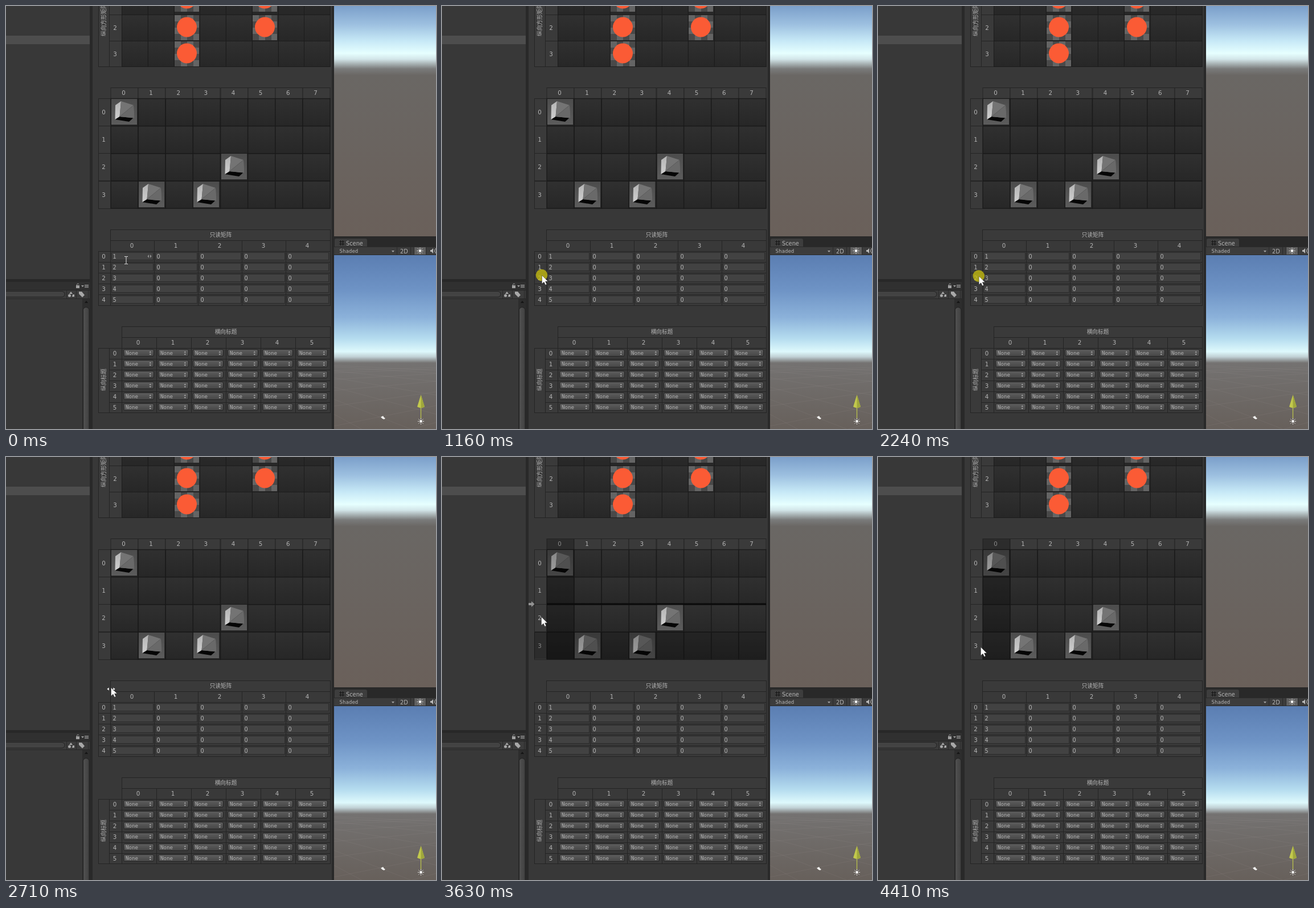
Animation of 755 by 742 pixels, one loop 5100 ms. Source, as an HTML page:

```html
<!DOCTYPE html>
<html lang="zh">
<head>
<meta charset="utf-8">
<title>Matrix editor</title>
<style>
html, body { margin: 0; width: 100%; height: 100%; overflow: hidden; background: #383838; }
svg { display: block; width: 755px; height: 742px; }
text { font: 10.3px "DejaVu Sans", sans-serif; fill: #b4b4b4; }
.mid { text-anchor: middle; }
.cjk { font: 9.7px "Noto Sans CJK SC", "Noto Sans CJK", sans-serif; }
.small { font: 9.1px "DejaVu Sans Mono", monospace; }
.value { font-size: 9.8px; }
.tab { font-size: 9.8px; }
</style>
</head>
<body>
<svg id="stage" viewBox="0 0 755 742" xmlns="http://www.w3.org/2000/svg">
<defs>
  <linearGradient id="cell" x2="0" y2="1"><stop stop-color="#303030"/><stop offset="1" stop-color="#272727"/></linearGradient>
  <linearGradient id="tile" x2="0" y2="1"><stop stop-color="#4c4c4c"/><stop offset="1" stop-color="#5c5c5c"/></linearGradient>
  <linearGradient id="face" x2="0" y2="1"><stop stop-color="#b4b4b4"/><stop offset="1" stop-color="#cfcfcf"/></linearGradient>
  <linearGradient id="popup" x2="0" y2="1"><stop stop-color="#5e5e5e"/><stop offset="1" stop-color="#464646"/></linearGradient>
  <linearGradient id="thumb"><stop stop-color="#525252"/><stop offset="1" stop-color="#404040"/></linearGradient>
  <linearGradient id="gameSky" x2="0" y2="1">
    <stop stop-color="#7b9fca"/><stop offset=".08" stop-color="#9dc0e0"/><stop offset=".15" stop-color="#c6e8f6"/>
    <stop offset=".205" stop-color="#e6ffff"/><stop offset=".23" stop-color="#d3e6e9"/><stop offset=".272" stop-color="#7a7b7b"/>
    <stop offset=".3" stop-color="#6a6764"/><stop offset="1" stop-color="#6a605a"/>
  </linearGradient>
  <linearGradient id="sceneSky" x2="0" y2="1">
    <stop stop-color="#5b7eb2"/><stop offset=".2" stop-color="#6e93c5"/><stop offset=".36" stop-color="#8cb2da"/>
    <stop offset=".48" stop-color="#b5dcef"/><stop offset=".555" stop-color="#def9fc"/><stop offset=".585" stop-color="#c0d0d4"/>
    <stop offset=".62" stop-color="#747271"/><stop offset="1" stop-color="#67605b"/>
  </linearGradient>
  <clipPath id="sceneClip"><path d="M576 627H755V742H576z"/></clipPath>
  <g id="cube">
    <path fill="url(#tile)" d="M1 1h45v45H1z"/>
    <path fill="#060606" d="M7.500 37 16 31 41 33 32 41z"/>
    <path fill="url(#face)" d="M8 12 18 5 15.500 32 7.500 37z"/>
    <path fill="#747474" d="M18 5 40 12 41 34.500 15.500 32z"/>
    <path fill="#696969" d="M40 12 41 34.500 15.500 32z"/>
    <path fill="none" stroke="#555" stroke-width=".7" d="M15.500 32 40 12"/>
  </g>
  <g id="badge">
    <path fill="#494949" d="M0 0h43v44H0z"/>
    <path fill="#646464" d="M0 0h11v11H0zM22 0h11v11H22zM11 11h11v11H11zM33 11h10v11H33zM0 22h11v11H0zM22 22h11v11H22zM11 33h11v11H11zM33 33h10v11H33z"/>
    <circle cx="21.5" cy="21" r="17.5" fill="#fb5b35"/>
  </g>
  <g id="sun">
    <circle r="2.4" fill="#f4f4f4"/>
    <path stroke="#e4e4e4" d="M0-5.5V-3.5M0 3.5V5.5M-5.5 0H-3.5M3.5 0H5.5M-4-4-2.7-2.7M4-4 2.7-2.7M-4 4-2.7 2.7M4 4 2.7 2.7"/>
  </g>
</defs>
<g id="view"></g>
<g id="cubes"></g>
<path id="colDim" fill="#000" fill-opacity=".25" d="M184 144h48v211h-48z"/>
<path id="rowDim" fill="#000" fill-opacity=".25" d="M162 0h407v47H162z"/>
<g id="marker">
  <path fill="#0b0b0b" d="M184-1.5H569V1.5H184z"/>
  <path fill="#929292" d="M152-2h5v-3l5.5 5-5.5 5v-3h-5z"/>
</g>
<path id="drag" fill="#949494" d="M251 436v6l-2.500-3zM253 436v6l2.500-3z"/>
<circle id="press" r="10.3" fill="#c6be10" fill-opacity=".78"/>
<g id="cursor">
  <path id="arrow" fill="#fff" stroke="#222" stroke-width=".4" d="M.5 .5V15.200L4 12 6.500 17.200 8.800 16.200 6.500 11H11z"/>
  <path id="beam" fill="none" stroke="#e2e2e2" d="M-3-6.500h2.500l.5.5.5-.5H3M0-6V6M-3 6.500h2.500L0 6l.5.5H3"/>
  <path id="resize" fill="#fff" stroke="#222" stroke-width=".5" d="M-3 0v6l-4-3zM4 0v6l4-3z"/>
</g>
</svg>
<script>
const $ = id => document.getElementById(id);
const LOOP = 5100, TICK = 77.4;
const EDGE = '#242424';
let out = '';

const rect = (x, y, w, h, fill, more = '') =>
  out += `<rect x="${x}" y="${y}" width="${w}" height="${h}" fill="${fill}" ${more}/>`;
const box = (x, y, w, h, fill = '#3a3a3a') =>
  rect(x + .5, y + .5, w, h, fill, `stroke="${EDGE}"`);
const text = (x, y, s, cls = 'mid', more = '') =>
  out += `<text x="${x}" y="${y}" class="${cls}" ${more}>${s}</text>`;
const path = (d, fill, more = '') => out += `<path d="${d}" fill="${fill}" ${more}/>`;
const line = (d, color, more = '') => path(d, 'none', `stroke="${color}" ${more}`);
const use = (id, x, y) => `<use href="#${id}" x="${x}" y="${y}"/>`;
const times = (n, fn) => { for (let i = 0; i < n; i++) fn(i); };
const upright = (x, y, s, anchor) =>
  text(0, 0, s, 'cjk ' + anchor, `transform="translate(${x} ${y}) rotate(-90)"`);

function sidePanel() {
  rect(0, 52, 147, 15, '#4d4d4d');
  rect(0, 479, 148, 5, '#282828');
  rect(0, 484, 148, 14, '#303030');
  rect(0, 498, 148, 15, '#3b3b3b');
  line('M0 498.5H148M0 513.5H148', '#262626');
  rect(-10, 500.5, 113, 10, '#434343', 'rx="5" stroke="#222"');
  rect(123, 490, 6, 5, '#a0a0a0');
  line('M124.5 490v-1.5a1.8 1.8 0 0 1 3.5 0', '#a0a0a0');
  path('M132 490h5l-2.5 3z', '#a0a0a0');
  line('M138 489.5h7M138 491.5h7M138 493.5h7', '#a0a0a0');
  line('M106.5 499v14M123.5 499v14M144.5 499v14', '#2a2a2a');
  path('M114 501l3 4h-6zM117 506h3v4h-4z', '#a8a8a8');
  path('M109 508a2.5 2.5 0 1 0 5 0a2.5 2.5 0 1 0-5 0', '#a8a8a8');
  path('M128 501h5l5 6-4 4-6-6z', '#a8a8a8');
  rect(134, 514, 14, 228, '#2d2d2d');
  path('M138 521h6l-3-4z', '#151515');
  rect(135.5, 528.5, 10.5, 230, 'url(#thumb)', 'rx="5" stroke="#202020"');
  rect(147, 0, 5, 742, '#292929');
}

function badgeTable() {
  box(162, -20, 19, 126);
  box(181, -20, 22, 126);
  upright(174.5, 53, '纵向方形矩阵', '');
  [-31, 15, 61].forEach((y, r) => {
    box(181, y, 22, r == 2 ? 45 : 46);
    if (r) text(191.5, y + 27, r + 1);
    times(8, c => {
      const x = Math.round(203 + c * 45.75);
      rect(x + .5, y + .5, 45.75, r == 2 ? 45 : 46, 'url(#cell)', 'stroke="#1c1c1c"');
      if (c == 2 || c == 5 && r < 2) out += use('badge', x + 1, y + (r ? 1 : -3));
    });
  });
}

function cubeTable() {
  times(8, c => {
    const x = 184 + c * 48.13;
    box(Math.round(x) - .5, 143, 48, 19);
    text(x + 22.5, 156, c);
    times(4, r => rect(x, 162.5 + r * 48.2, 48.13, 48, 'url(#cell)', 'stroke="#1a1a1a" stroke-width="1.4"'));
  });
  times(4, r => {
    box(162, Math.round(162 + r * 48.2), 21, 48);
    text(171.5, Math.round(190 + r * 48.2), r);
  });
}

function numberTable() {
  box(183, 392, 386, 19);
  text(377, 405, '只读矩阵', 'cjk mid');
  times(5, c => {
    box(183 + c * 77, 411, c < 4 ? 77 : 78, 19, '#393939');
    text(221 + c * 77, 424, c);
  });
  times(5, r => {
    const y = 430 + Math.round(r * 18.9);
    box(162, y, 21, 19);
    text(171.5, y + 13, r);
    times(5, c => {
      const x = 183 + c * 77;
      box(x, y, c < 4 ? 77 : 78, 19, '#393939');
      rect(x + 2.5, y + 2.5, 73, 13, '#424242', 'stroke="#2b2b2b"');
      text(x + 4.5, y + 12.5, c ? 0 : r + 1, 'value');
    });
  });
}

function popupTable() {
  box(203, 562, 366, 19);
  text(386, 574.5, '横向标题', 'cjk mid');
  box(162, 600, 19, 113);
  upright(175, 655.5, '纵向标题', 'mid');
  times(6, c => {
    box(203 + c * 61, 581, 61, 19, '#393939');
    text(232 + c * 61, 594, c);
  });
  times(6, r => {
    const y = 600 + r * 19;
    box(181, y, 22, r < 5 ? 19 : 18);
    text(191, y + 13, r);
    times(6, c => {
      const x = 203 + c * 61;
      box(x, y, 61, r < 5 ? 19 : 18, '#393939');
      rect(x + 3.5, y + 2.5, 53, 12, 'url(#popup)', 'rx="2.5" stroke="#242424"');
      text(x + 7, y + 12, 'None', 'small');
      path(`M${x + 48.5} ${y + 8}h3.6l-1.8-2.500zM${x + 48.5} ${y + 10}h3.6l-1.8 2.500z`, '#a5a5a5');
    });
  });
}

function rightPanel() {
  rect(572, 0, 4, 742, '#292929');
  rect(576, 0, 179, 405, 'url(#gameSky)');
  rect(576, 404, 179, 18, '#292929');
  path('M577 422V411q0-3 3-3H631q3 0 3 3V422z', '#3d3d3d');
  line('M587.5 411v9M591.5 411v9M585 413.5h9M585 417.5h9', '#151515');
  text(597, 419.5, 'Scene', 'tab');
  rect(576, 422, 179, 15, '#3c3c3c');
  line('M576 422.5H755M576 436.5H755', '#2a2a2a');
  text(585.5, 433, 'Shaded', 'small');
  path('M677 429h5l-2.5 3z', '#a5a5a5');
  rect(717, 423, 20, 13, '#606060');
  line('M686.5 423v13M710.5 423v13M716.5 423v13M737.5 423v13', '#2a2a2a');
  text(692, 433.5, '2D', 'tab');
  out += use('sun', 727, 429.5);
  path('M745 428h2l3-3v9l-3-3h-2z', '#b8b8b8');
  line('M752 427q2 2.5 0 5M754 425q3 4.5 0 9', '#b8b8b8');

  rect(576, 437, 179, 305, 'url(#sceneSky)');
  out += '<g clip-path="url(#sceneClip)" stroke="#b0aaa4" stroke-opacity=".13" stroke-width=".8">';
  times(9, i => {
    path(`M1150 622 560 ${640 + i * i * 4}`, 'none');
    path(`M400 622 770 ${640 + i * i * 5}`, 'none');
  });
  out += '</g>';
  line('M728.5 703V723', '#b9c14d', 'stroke-width="1.3"');
  path('M728.5 682 735 703q-6.5 4-13 0z', '#c2c94d');
  path('M728.5 682 735 703q-3 2-6.5 2z', '#9fa73c');
  out += use('sun', 728.5, 728.5);
  path('M658 721l4-2 2 3 2 1-2 2-3-1z', '#f4f4f2');
}

sidePanel();
badgeTable();
cubeTable();
numberTable();
popupTable();
rightPanel();
$('view').innerHTML = out;

const cubeAt = (c, r) => use('cube', 184 + Math.round(c * 48.13), 162 + Math.round(r * 48.2));
const cubeSet = (one, pair) => [[0, 0], [4, one], [1, pair], [3, pair]].map(p => cubeAt(...p)).join('');
$('cubes').innerHTML = `<g id="before">${cubeSet(2, 3)}</g><g id="after">${cubeSet(3, 2)}</g>`;

// Pointer stops: tick, x, y
const stops = [
  [0, 211, 446], [3, 190, 449], [5, 167, 446], [7, 171, 435], [8, 171, 435],
  [10, 173, 458], [13, 175, 472], [15, 175, 472], [17, 175, 431], [18, 175, 427],
  [20, 175, 427], [21, 176, 440], [24, 175, 449], [26, 175, 449], [31, 178, 490],
  [32, 178, 490], [33, 179, 480], [35, 184, 404], [36, 192, 335], [37, 166, 291],
  [38, 166, 291], [41, 172, 332], [45, 174, 284], [47, 174, 280], [48, 176, 288],
  [53, 176, 288], [54, 177, 297], [57, 180, 333], [99, 180, 333]
];
const presses = [[8, 13], [15, 18], [26, 31], [41, 46], [53, 57]];

function pointer(k) {
  const i = stops.findIndex(s => s[0] > k);
  const [a, x0, y0] = stops[i - 1], [b, x1, y1] = stops[i];
  const p = (k - a) / (b - a);
  return [x0 + (x1 - x0) * p, y0 + (y1 - y0) * p];
}
const show = (id, on) => $(id).style.display = on ? '' : 'none';
const move = (id, x, y) => $(id).setAttribute('transform', `translate(${x} ${y})`);

function draw() {
  const k = Math.floor((performance.now() % LOOP + 8) / TICK);
  const within = (a, b) => k >= a && k < b;
  const [x, y] = pointer(k);
  const editing = x > 186 && y > 430;
  const swapped = within(48, 57);

  move('cursor', x, y);
  move('press', x, y);
  show('arrow', !editing);
  show('beam', editing);
  show('drag', editing);
  show('resize', k == 35);
  show('press', presses.some(p => within(...p)));

  show('before', !swapped);
  show('after', swapped);
  show('colDim', k >= 41);
  show('rowDim', within(42, 48) || within(54, 57));
  move('rowDim', 0, swapped ? 259 : 307);
  show('marker', within(43, 48) || within(55, 57));
  move('marker', 0, swapped ? 354 : 258);
  requestAnimationFrame(draw);
}
draw();
</script>
</body>
</html>
```
